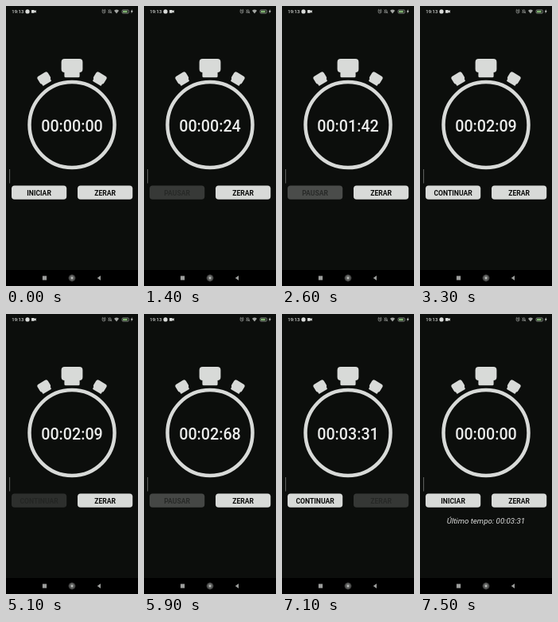
An HTML page that plays this animation: 166x350 px, repeating every 8 s.

```html
<!DOCTYPE html>
<html lang="pt-BR">
<head>
<meta charset="utf-8">
<title>Cronômetro</title>
<style>
  html, body { margin: 0; width: 100%; height: 100%; overflow: hidden; background: #0c0e0c; }
  svg { display: block; width: 166px; height: 350px; font-family: Roboto, sans-serif; fill: #d8dad8; }
  text { text-anchor: middle; }
  #time { font-size: 19.7px; font-weight: 500; fill: #ebeceb; }
  .button text { font-size: 8.6px; font-weight: 700; fill: #0a0b0a; }
  #last { font-size: 9.75px; font-style: italic; fill: #e0e1e0; }
  .line { fill: none; stroke: #a4a6a4; stroke-width: .7; }
</style>
</head>
<body>
<svg viewBox="0 0 166 350">
  <defs>
    <g id="knob">
      <rect x="-7.6" y="-74" width="15.2" height="11" rx="2.8"/>
      <rect x="-6.2" y="-66" width="12.4" height="5.6" rx="1"/>
    </g>
  </defs>

  <!-- status bar -->
  <text x="14.8" y="9" font-size="5.9" font-weight="500">19:13</text>
  <circle cx="27" cy="6.9" r="2.6"/>
  <path d="M32 5h3.8v1.2l2-1.2v3.8l-2-1.2v1.2H32z"/>
  <circle cx="123" cy="7" r="2" class="line"/>
  <path d="M120.6 5.2l1.3-1.2M125.4 5.2l-1.3-1.2M123 5.8v1.4h1" class="line"/>
  <path d="M128.6 8.2c1-1 .3-3.6 2-3.6s1 2.6 2 3.6zM128.4 4.6l4.4 4.6" class="line"/>
  <path d="M136 5.8q3-2.6 6 0l-3 3.6z" fill="#a4a6a4"/>
  <rect x="146" y="4.9" width="8.4" height="4.2" rx="1.2" class="line"/>
  <rect x="147" y="5.7" width="5.6" height="2.6" fill="#7fb070"/>
  <path d="M158.8 4l-2.1 3.2h1.3l-.5 2.4 2.2-3.3h-1.3z"/>

  <!-- stopwatch -->
  <g transform="translate(83 148.6)">
    <circle r="53.5" fill="none" stroke="#d8dad8" stroke-width="4.5"/>
    <rect x="-13.4" y="-82.6" width="26.8" height="17" rx="4"/>
    <rect x="-9.6" y="-68" width="19.2" height="8.6" rx="1.5"/>
    <use href="#knob" transform="rotate(-31)"/>
    <use href="#knob" transform="rotate(31)"/>
  </g>
  <text id="time" x="83" y="157.4"></text>
  <rect x="4" y="204" width="1.1" height="17.6" fill="#5a5c5a"/>

  <g class="button" id="left">
    <rect x="7" y="224.5" width="69.2" height="17.3" rx="3.8"/>
    <text x="41.6" y="236.5"></text>
  </g>
  <g class="button" id="right">
    <rect x="90" y="224.5" width="69.2" height="17.3" rx="3.8"/>
    <text x="124.6" y="236.5">ZERAR</text>
  </g>
  <text id="last" x="83" y="261.7">Último tempo: 00:03:31</text>

  <!-- navigation bar -->
  <rect y="330" width="166" height="20" fill="#000"/>
  <g fill="#9c9e9c">
    <rect x="45.9" y="337.4" width="5.2" height="5.2"/>
    <circle cx="83" cy="340" r="2.4"/>
    <circle cx="83" cy="340" r="3.6" fill="none" stroke="#9c9e9c" stroke-width=".8"/>
    <path d="M119 337v6l-4.3-3z"/>
  </g>
</svg>
<script>
const LOOP = 8000, STEP = 100, RESET = 7300;
const $ = id => document.getElementById(id);

// [ms, value] points, joined by straight lines
const count = [[1156, 0], [1400, 24], [2600, 142], [3200, 209], [5290, 209], [6550, 331]];
const leftAlpha = [[800, 1], [900, .3], [1000, .2], [1400, .21], [1700, .3], [2900, .3],
  [3100, .15], [3300, 1], [5000, 1], [5100, .16], [5400, .16], [5700, .28],
  [6300, .28], [6500, .14], [6600, .14], [6800, 1]];
const rightAlpha = [[7000, 1], [7100, .2], [7300, .2], [7500, 1]];
const labels = [[0, 'INICIAR'], [1200, 'PAUSAR'], [3200, 'CONTINUAR'],
  [5300, 'PAUSAR'], [6600, 'CONTINUAR'], [RESET, 'INICIAR']];

function at(points, t) {
  const i = points.findIndex(p => p[0] > t);
  if (i < 0) return points[points.length - 1][1];
  if (i === 0) return points[0][1];
  const [t0, a] = points[i - 1], [t1, b] = points[i];
  return a + (b - a) * (t - t0) / (t1 - t0);
}

const pad = n => String(n).padStart(2, '0');
const clock = n => [n / 6000, n / 100 % 60, n % 100].map(v => pad(Math.floor(v))).join(':');

function setButton(id, alpha) {
  const button = $(id);
  button.setAttribute('opacity', alpha);
  button.lastElementChild.setAttribute('opacity', Math.min(1, alpha * 1.8));
}

function draw(now) {
  const t = Math.floor(now % LOOP / STEP) * STEP;
  const done = t >= RESET;
  $('time').textContent = clock(done ? 0 : Math.round(at(count, t)));
  $('left').lastElementChild.textContent = labels.filter(l => l[0] <= t).pop()[1];
  setButton('left', at(leftAlpha, t));
  setButton('right', at(rightAlpha, t));
  $('last').setAttribute('visibility', done ? 'visible' : 'hidden');
}

const start = performance.now();
function tick() {
  draw(performance.now() - start);
  requestAnimationFrame(tick);
}
tick();
</script>
</body>
</html>
```
